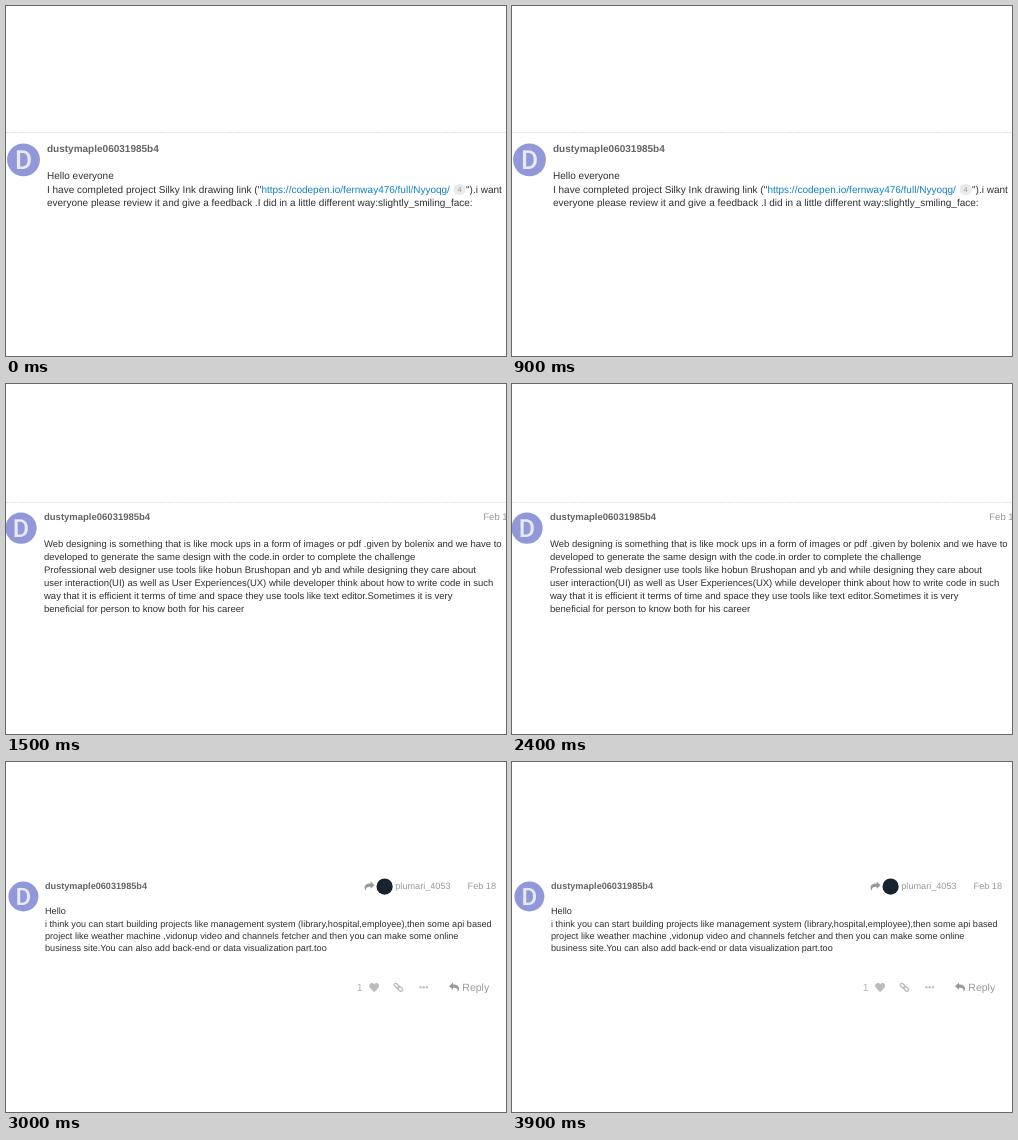
Write an HTML page that moves like this. It is 500 px wide and 350 px high and loops after 4.5 s.

```html
<!DOCTYPE html>
<html lang="en">
<head>
<meta charset="utf-8">
<title>Forum posts</title>
<style>
  html, body { margin: 0; width: 100%; height: 100%; overflow: hidden; background: #fff; }
  svg { display: block; width: 100vw; height: 100vh; }
  text {
    font-family: Arial, "Liberation Sans", sans-serif;
    text-rendering: geometricPrecision;
    white-space: pre;
    fill: #303030;
  }
  .name { font-weight: bold; fill: #646464; }
  .soft { fill: #999; }
  .pale { fill: #b3b3b3; }
  .link { fill: #0f82c0; }
  .initial { font-family: Roboto, sans-serif; font-weight: 500; fill: #e8eaf8; text-anchor: middle; }
</style>
</head>
<body>
<svg id="stage" viewBox="0 0 500 350" xmlns="http://www.w3.org/2000/svg"></svg>
<script>
const HOLD = 1500;
const USER = "dustymaple06031985b4";

const label = (x, y, size, str, cls = "") =>
  `<text x="${x}" y="${y}" font-size="${size}" class="${cls}">${str}</text>`;

const lines = (x, y, size, step, rows) =>
  rows.map((row, i) => label(x, y + i * step, size, row)).join("");

const avatar = (x, y, r) =>
  `<circle cx="${x}" cy="${y}" r="${r}" fill="#9198d9"/>` +
  label(x, y + r * 0.57, r * 1.6, "D", "initial");

const divider = y =>
  `<path d="M0 ${y}H500" stroke="#e2e2e2" stroke-dasharray="2 .7"/>`;

// Curved arrow pointing left; flip = -1 mirrors it
const arrow = (x, y, flip = 1) =>
  `<path transform="translate(${x} ${y}) scale(${flip} 1)" fill="#999"
     d="M0 3.6L4 0V2C8.5 2 10.2 4 10 6.4C9.9 7.8 9.2 8.6 8.6 9.3C9 6.5 8 5.2 4 5.2V7.2Z"/>`;

const heart = (x, y) =>
  `<path transform="translate(${x} ${y})" fill="#bbb"
     d="M5 9.6L.9 5.4C-.6 3.6 0 .4 2.7 .4C3.9 .4 4.6 1.1 5 1.8C5.4 1.1 6.1 .4 7.3 .4C10 .4 10.6 3.6 9.1 5.4Z"/>`;

const chain = (x, y) =>
  `<g transform="translate(${x} ${y}) rotate(42)" fill="none" stroke="#bbb" stroke-width="1.3">
     <rect x="-5.2" y="-1.6" width="5.8" height="3.2" rx="1.6"/>
     <rect x="-.6" y="-1.6" width="5.8" height="3.2" rx="1.6"/>
   </g>`;

const dots = (x, y) => [0, 3.3, 6.6].map(dx =>
  `<rect x="${x + dx}" y="${y}" width="2.4" height="2.1" rx=".6" fill="#bbb"/>`).join("");

const linkPost = () =>
  divider(126.5) + avatar(17.5, 153.8, 16.4) +
  label(41, 145.6, 10, USER, "name") +
  label(41, 173.2, 10, "Hello everyone") +
  label(41, 186.7, 10, 'I have completed project Silky Ink drawing link ("') +
  label(255.4, 186.7, 10, "https://codepen.io/fernway476/full/Nyyoqg/", "link") +
  `<ellipse cx="453.6" cy="183.5" rx="6.2" ry="5.6" fill="#e9e9e9"/>` +
  label(451.6, 186.1, 7.2, "4", "soft") +
  label(460, 186.7, 10, '").i want') +
  label(41, 200.2, 10, "everyone please review it and give a feedback .I did in a little different way:slightly_smiling_face:");

const designPost = () =>
  divider(118.5) + avatar(15, 144.1, 15.6) +
  label(38, 136.3, 9.5, USER, "name") +
  label(477.3, 136.3, 9.5, "Feb 1", "soft") +
  lines(38, 163, 9.5, 12.9, [
    "Web designing is something that is like mock ups in a form of images or pdf .given by bolenix and we have to",
    "developed to generate the same design with the code.in order to complete the challenge",
    "Professional web designer use tools like hobun Brushopan and yb and while designing they care about",
    "user interaction(UI) as well as User Experiences(UX) while developer think about how to write code in such",
    "way that it is efficient it terms of time and space they use tools like text editor.Sometimes it is very",
    "beneficial for person to know both for his career"
  ]);

const ideasPost = () =>
  avatar(17.4, 134.5, 15) +
  label(39, 127.3, 9.14, USER, "name") +
  arrow(368.6, 119.6, -1) +
  `<circle cx="378.6" cy="124.6" r="8.1" fill="#16232f"/>` +
  label(389.3, 127.3, 9.14, "plumari_4053", "soft") +
  label(461.6, 127.3, 9.14, "Feb 18", "soft") +
  lines(39, 152.2, 9.14, 12.35, [
    "Hello",
    "i think you can start building projects like management system (library,hospital,employee),then some api based",
    "project like weather machine ,vidonup video and channels fetcher and then you can make some online",
    "business site.You can also add back-end or data visualization part.too"
  ]) +
  label(350.8, 229.3, 10.5, "1", "pale") +
  heart(363.2, 220.6) + chain(392.4, 225.3) + dots(413.2, 224.2) +
  arrow(443, 220.6) + label(456.3, 229.3, 10.5, "Reply", "soft");

const posts = [linkPost, designPost, ideasPost];
const stage = document.getElementById("stage");
const start = performance.now();
let shown = -1;

function draw(ms) {
  const i = Math.floor(ms / HOLD) % posts.length;
  if (i === shown) return;
  shown = i;
  stage.innerHTML = posts[i]();
}

function tick() {
  draw(performance.now() - start);
  requestAnimationFrame(tick);
}
tick();
</script>
</body>
</html>
```
